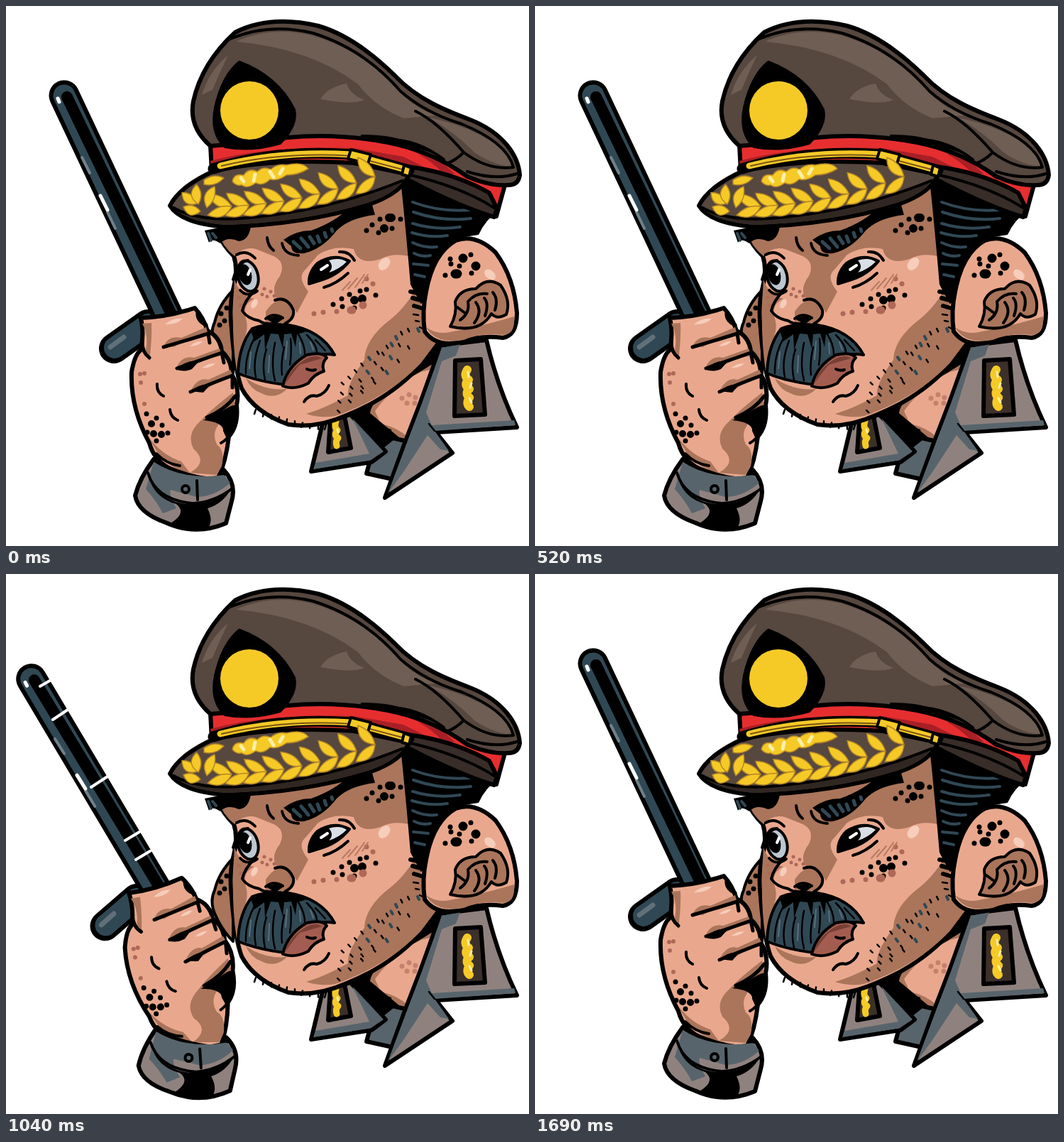
These frames come from a looping animation (737x760 px, 1820 ms). An HTML page:

```html
<!DOCTYPE html>
<html lang="en">
<head>
<meta charset="utf-8">
<title>Officer with baton</title>
<style>
html, body { margin: 0; height: 100%; overflow: hidden; background: #fff }
svg { display: block; width: 737px; height: 760px }
path, circle, ellipse { stroke-linecap: round; stroke-linejoin: round; fill: none }
.o { stroke: #000; stroke-width: 6 }
.l { stroke: #000; stroke-width: 4 }
.t { stroke: #000; stroke-width: 2.5 }
.k { fill: #000 }
.skin { fill: #e9a88d }
.shade { fill: #aa755b }
.pink { fill: #f7cdbb }
.cap { fill: #56473f }
.capLight { fill: #6f5e54 }
.red { fill: #e62e2f }
.gold { fill: #f5ca27 }
.navy { fill: #304854 }
.cloth { fill: #8f827e }
.clothDark { fill: #58646b }
.sn { stroke: #304854; stroke-width: 4 }
.sg { stroke: #f5ca27; stroke-width: 5 }
.sw { stroke: #fff; stroke-width: 4 }
.mole { stroke: #000; stroke-width: 10 }
.mole.s { stroke-width: 7 }
.spot { stroke: #ad6858; stroke-width: 7 }
.leaf { fill: #f5ca27; stroke: #b48526; stroke-width: 1.5 }
</style>
</head>
<body>
<svg viewBox="0 0 737 760">
<!-- neck and collar -->
<path class="k" d="M470 574L525 556L575 612L535 632Z"/>
<path class="shade" d="M475 565L590 480L620 490L575 620L535 600Z"/>
<path class="skin" d="M520 570Q545 535 585 515L605 510L568 608Q550 592 528 588Z"/>
<path class="k" d="M475 570Q550 550 612 470L622 490Q575 522 545 535Q515 556 513 573L555 608L536 605L500 582Z"/>
<path class="spot" style="opacity:.6" d="M558 552h0M568 547h0M577 551h0M565 559h0M576 559h0"/>
<path class="t" d="M518 588Q532 594 542 597"/>
<path class="o clothDark" d="M515 632L508 658L545 666L575 615L545 608Z"/>
<path class="o cloth" d="M430 655L446 588L485 575L535 627L515 642Z"/>
<path class="clothDark" d="M433 652L436 643L512 630L488 580L532 627L514 639Z"/>
<path class="o cloth" d="M534 692L563 612Q590 545 612 478L677 470Q692 535 720 593L606 600L629 629Z"/>
<path class="clothDark" d="M538 686L566 612Q592 545 614 481L640 476L634 492L614 500L592 572L600 590L716 583L718 590L604 598L624 626L612 624L594 604L560 656Z"/>
<path class="t" d="M604 598L596 588"/>
<path class="o" style="fill:#3c302b" d="M633 499L669 497L675 575L632 577Z"/>
<path class="o" style="fill:#3c302b" d="M457 583L477 577L486 622L454 628Z"/>
<path class="sg" style="stroke-width:12" d="M650 512q-6 9 2 14q-8 7 1 13q-7 6 0 12q-5 8 0 13"/>
<path class="sg" style="stroke-width:9" d="M465 584q-3 9 2 13q-6 7 1 11q-4 4-2 11"/>
<path style="stroke:#fff0a0;stroke-width:3" d="M651 515l1 7M656 531l-2 6M653 552l3 6M467 596l1 4"/>

<!-- far ear, head -->
<path class="l shade" d="M320 400Q300 420 294 445Q286 462 296 482Q305 502 320 517Z"/>
<path class="mole s" d="M303 433h0M308 443h0M301 449h0M311 425h0"/>
<path class="o skin" d="M298 318Q306 338 321 352Q327 370 321 395Q314 420 318 455Q322 510 332 538Q350 572 398 589Q438 595 480 576Q540 552 580 510L612 470L600 270L400 290Z"/>
<path class="shade" d="M297 316L345 310L560 256L568 352Q544 347 528 356Q496 366 490 342Q462 336 440 350L421 372Q410 382 426 402L410 432Q400 412 382 412Q372 398 386 380Q396 358 372 350L352 342Q335 338 322 352Q306 340 297 316Z"/>
<path class="shade" d="M578 398Q560 428 538 444Q506 470 505 498Q480 532 482 548Q450 566 423 574Q455 584 480 571Q545 545 585 502L606 474L590 440Z"/>
<path class="shade" d="M322 385Q330 408 350 412Q332 420 338 440Q343 455 333 475L326 520Q316 460 322 385ZM338 524Q365 542 396 539Q380 555 360 545Q345 540 338 524Z"/>
<path class="k" d="M280 316L300 312L345 310Q342 330 328 331Q312 324 302 334Q290 326 286 333Z"/>
<path class="sn" d="M285 320l4 10M291 320l5 6"/>

<!-- hair -->
<path class="k" d="M556 244L693 290Q676 300 666 322L640 326Q612 344 603 365L594 400L585 420L570 392Q564 320 556 244Z"/>
<path class="sn" d="M573 276Q615 292 664 286M574 290Q615 304 655 299M573 306Q605 316 640 311M572 319Q598 327 622 323M573 333Q590 341 607 339M575 348Q587 354 598 351M574 363L595 365M576 378L590 381"/>
<path class="o" d="M570 402l17 3M573 411l15 4M575 422l10 3"/>
<path class="t" d="M574 434l7 1M577 443l5 1M583 452l4 2"/>

<!-- near ear -->
<path class="o skin" d="M592 402Q602 348 634 330Q662 320 690 347Q716 382 720 432Q720 464 700 467Q670 463 645 472Q607 482 590 458Q586 430 592 402Z"/>
<path class="shade" d="M592 452Q608 464 630 458Q665 452 716 437Q718 463 700 463Q670 459 645 470Q606 477 592 452Z"/>
<path class="l shade" d="M626 451Q636 434 633 416Q640 398 662 398Q678 380 697 393Q712 415 705 434Q692 442 684 433Q668 461 626 451Z"/>
<path class="l" d="M640 442Q654 432 651 416Q662 403 678 405M660 446Q672 430 662 417M675 436Q681 419 674 411M689 428Q694 412 686 403M636 424L648 433"/>
<path class="mole" style="stroke-width:13" d="M633 377h3M644 355h0M662 366h0"/>
<path class="mole s" d="M627 363h0M619 379h0M639 366h0M655 350h0M656 376h0M626 356h0"/>
<g id="gloss"><ellipse class="pink" cx="533" cy="363" rx="7" ry="10" transform="rotate(40 533 363)"/><ellipse class="pink" cx="682" cy="378" rx="6" ry="9" transform="rotate(-50 682 378)"/></g>

<!-- eyes, brow, nose -->
<ellipse class="l" style="fill:#bcc7d0" cx="341" cy="380" rx="14" ry="22" transform="rotate(-15 341 380)"/>
<ellipse class="k" cx="337" cy="378" rx="9" ry="15" transform="rotate(-15 337 378)"/>
<path class="sw" d="M344 371l-3 7"/>
<path class="l" d="M320 385Q327 360 341 358M325 350Q339 342 351 355M330 400Q340 411 354 401"/>
<path class="l k" d="M427 391Q426 375 439 362Q462 347 484 359Q468 379 443 386Z"/>
<path style="fill:#d9e0e5" d="M455 358Q470 353 480 360Q469 371 455 375Q463 367 455 358Z"/>
<path class="sw" d="M444 371l9-6"/>
<path class="l" d="M448 396Q466 391 482 376M470 346Q484 345 491 358"/>
<g id="brow">
<path class="k" d="M391 329Q408 316 430 316Q466 303 484 283L514 273L520 294Q484 298 466 316Q446 342 420 348Q402 350 402 338Z"/>
<path class="sn" style="stroke-width:5" d="M405 332l10 9M416 327l10 12M428 325l6 9M439 324l3 8M449 319l2 6M459 314l1 3"/>
<path class="l" d="M368 326Q369 338 377 344M389 334Q392 350 412 351"/>
</g>
<path class="shade" d="M366 430Q378 412 393 413Q407 424 404 440Q385 451 366 445Z"/>
<path class="l" d="M350 401Q336 415 333 429Q340 440 357 443Q363 448 376 447M379 414Q396 408 405 428Q407 440 393 447M366 440Q377 431 390 439"/>
<path class="k" d="M366 440Q380 434 391 440L380 448Z"/>
<ellipse class="pink" cx="350" cy="419" rx="4" ry="7" transform="rotate(30 350 419)"/>

<!-- moustache and mouth -->
<path class="l navy" d="M327 517Q328 478 347 454Q368 446 398 449Q444 456 463 491Q445 488 427 494Q405 505 393 533Q353 528 327 517Z"/>
<path class="k" d="M345 457Q370 442 405 449L428 457L410 462L408 480L402 461L392 462L390 482L384 462L373 461L365 484L364 462L350 472Z"/>
<path class="t" d="M351 466Q337 490 338 517M358 471Q347 500 352 522M367 483Q360 505 365 526M379 474Q373 505 379 527M392 480Q387 502 389 519M401 468Q403 488 400 505M412 462Q422 478 421 493M424 463Q438 477 438 487M436 470L450 485"/>
<path style="stroke:#59707b;stroke-width:2" d="M345 487L343 510M371 492L370 516M396 472L394 497M414 474L415 489M429 473L433 484"/>
<path class="l" style="fill:#a35d50" d="M390 535Q396 507 424 491Q446 486 452 495Q444 503 448 514Q434 518 426 531Q406 541 390 535Z"/>
<path style="fill:#783f35" d="M394 531Q398 511 424 496Q438 490 445 496Q431 500 414 505Q405 515 394 531Z"/>
<path class="l" d="M424 511Q430 514 436 512M420 557Q427 546 438 549Q450 546 455 534"/>

<!-- moles, stubble -->
<path class="mole" style="stroke-width:12" d="M540 298h3M533 313h0M502 412h0M491 414h0"/>
<path class="mole s" d="M527 300h0M516 308h0M508 316h0M525 319h0M544 313h0M556 300h0M461 420h0M473 412h0M484 406h0M474 423h0M499 401h0M508 399h0M521 407h0M491 425h0"/>
<path class="spot" d="M447 431h0M466 430h0M434 433h0M517 391h0M508 384h0"/>
<path class="spot" style="stroke-width:11" d="M486 428h2M503 421h0"/>
<path class="spot" style="stroke-width:5" d="M364 398h0M373 402h0M368 409h0M378 408h0M361 406h0M330 421h0M328 410h0"/>
<path style="stroke:#b77962;stroke-width:2" d="M474 400l11-12M482 398l13-15M492 396l13-18M502 390l8-12"/>
<g id="stubble"></g>

<!-- cap -->
<path class="o red" d="M288 196L440 172L560 185L703 252L691 296L560 245L488 226L290 233Z"/>
<path style="fill:#a81f25" d="M288 218Q370 196 490 200L560 212L612 238L560 228L488 208Q380 200 290 232ZM545 190Q590 196 632 236L618 239Q600 214 545 190Z"/>
<path class="o" style="fill:#382d28" d="M565 226Q630 234 681 263L692 285L688 297Q640 283 563 243Z"/>
<path class="l" d="M570 238Q640 254 688 284"/>
<path class="o cap" d="M288 197Q257 170 264 134Q276 80 323 37Q372 12 440 28Q492 43 548 98C580 132 622 148 654 160C700 178 722 210 724 238Q722 252 708 252Q682 254 650 240Q600 204 538 192Q440 174 350 192Z"/>
<path class="capLight" d="M324 50Q372 28 430 41Q500 61 548 114Q572 142 606 154L560 158Q520 142 496 110Q430 60 324 50ZM596 157Q692 178 716 226Q690 226 660 206Q633 178 596 157ZM443 131Q453 114 480 109Q485 125 505 132Q488 140 443 131ZM276 125Q286 92 313 69Q301 94 291 118Z"/>
<path class="l" d="M314 47Q370 23 432 38Q504 60 556 120Q590 150 642 166Q706 192 715 227Q680 232 645 206M645 206Q633 218 620 222M577 148Q608 163 645 206M540 188Q580 188 617 216M720 236Q690 246 650 233"/>
<path class="k" d="M500 181Q560 180 605 209Q570 194 500 187Z"/>
<path class="o k" d="M329 80Q382 100 405 146Q410 167 386 192Q345 204 309 197Q289 178 296 143Q306 99 329 80Z"/>
<circle class="gold" cx="343" cy="147" r="41"/>
<path class="o cap" d="M231 281Q244 255 291 233Q370 214 490 221L568 237Q558 263 512 279Q425 307 310 311Q246 306 231 281Z"/>
<path style="fill:#312722" d="M236 285Q270 298 330 299Q460 288 562 242Q550 264 510 277Q420 304 310 308Q255 303 236 285Z"/>
<path class="l" d="M236 284Q270 303 330 299Q450 290 558 246"/>
<path style="stroke:#000;stroke-width:15" d="M292 229Q380 201 488 209L568 231"/>
<path class="sg" style="stroke-width:9" d="M302 225Q390 203 486 209L566 231"/>
<path style="stroke:#7b5415;stroke-width:2" d="M304 225Q390 205 486 211L566 232"/>
<path class="l gold" d="M486 202l-4 13l28 7l4-13ZM561 224l10 4l-3 12l-10-3Z"/>
<g id="leaves"></g>
<path class="leaf" d="M319 247q2-12 16-9q7-11 19-5q9-8 19-3q10-9 22-6q23-6 31 5q-14 9-31 9q-12 9-23 6q-10 10-20 5q-12 9-20 3q-7 2-13-5ZM279 245q14-10 28-3q-12 13-28 9Z"/>
<path style="stroke:#fff0a8;stroke-width:5" d="M331 242l4 5M351 237l-2 9M372 233l5 8M390 229l-4 7"/>

<!-- moving arm -->
<path id="glint" style="fill:#fff"/>
<g id="hand">
<path style="stroke:#000;stroke-width:42" d="M152 482L200 448"/>
<path style="stroke:#304854;stroke-width:30" d="M153 481L200 448"/>
<path style="stroke:#607079;stroke-width:7" d="M147 480L166 466"/>
<path style="stroke:#000;stroke-width:43" d="M82 126L233 446"/>
<path style="stroke:#304854;stroke-width:31" d="M82 126L233 446"/>
<path style="stroke:#000;stroke-width:16" d="M86 128L237 442"/>
<path style="stroke:#70818a;stroke-width:4" d="M107 213L118 235M143 290L154 313"/>
<path class="sw" style="stroke-width:5" d="M73 130L75 135M133 267L143 287"/>
<path class="o skin" d="M190 439Q228 438 266 425Q278 438 284 457Q302 466 304 486Q318 498 318 518Q330 538 325 562Q328 590 314 606Q310 641 299 664Q269 669 237 654Q209 642 202 615Q175 565 177 515Q181 491 190 484Q195 460 190 439Z"/>
<path class="shade" d="M222 479Q229 463 247 467L282 452L285 463Q253 470 237 480ZM240 509Q248 491 265 495L301 482L305 492Q277 497 258 510ZM260 542Q270 522 285 526L316 512L321 522Q291 531 276 544ZM282 576Q294 564 320 544L324 571Q314 583 302 586Q289 600 297 617Q309 626 304 648L297 660L259 657Q286 642 264 623Q255 605 269 589Z"/>
<path class="shade" d="M192 447Q203 466 195 491Q201 497 202 499Q206 468 205 446ZM203 609Q220 632 247 641L259 657Q220 650 203 609Z"/>
<path class="k" d="M278 583L303 571Q324 557 326 564Q329 602 311 609L306 598Q307 586 278 583ZM239 511q20-15 32-10l-9 10q-12 5-23 0ZM260 542q15-12 27-8l-9 10Z"/>
<path class="o" style="stroke-width:5" d="M222 480Q253 471 285 461L287 474M241 510Q275 498 304 488L307 502M260 543Q290 531 319 520L319 537M283 579Q309 568 323 549M270 432Q269 443 282 449M192 470Q191 487 202 495"/>
<path class="l" d="M213 532Q212 544 222 549M231 568Q232 579 242 583M303 615Q315 608 313 602M212 630Q225 644 245 647"/>
<path class="pink" d="M224 448q12-10 25-8q-9 9-25 8ZM259 479q8-8 18-7q-6 7-18 7ZM277 509q9-7 18-6q-7 7-18 6Z"/>
<path class="mole" d="M205 588h0M208 602h0M219 603h0"/>
<path class="mole s" d="M199 600h0M212 580h0M220 590h0M198 574h0M228 601h0M212 612h0"/>
<path class="spot" style="stroke-width:6" d="M190 530h0M195 517h0M189 518h0M195 560h0"/>
</g>
<g id="cuff">
<path class="o cloth" d="M208 638Q240 660 289 666Q310 664 307 653Q325 672 318 697L310 728Q267 746 225 727Q186 713 182 689Q188 665 208 638Z"/>
<path class="clothDark" d="M208 642Q250 668 307 660L316 671Q295 690 269 691L232 681Q229 688 240 707L221 714Q211 695 197 680Z"/>
<path class="k" d="M204 671Q225 700 258 701Q291 703 317 680Q305 701 284 707Q294 727 282 738Q251 739 230 729Q256 714 240 701Q213 693 204 671Z"/>
<path class="l" d="M200 657Q211 695 263 700Q292 699 319 679M269 668L270 695"/>
<circle class="l clothDark" cx="253" cy="680" r="5"/>
</g>
<path id="ticks" class="sw"/>
</svg>
<script>
const get = id => document.getElementById(id);

// Leaf garland: pairs of leaves along a bending stem on the visor.
let leaves = '';
const leaf = (x, y, angle, size = 36) =>
  `<path class="leaf" d="M0 0Q${size / 2}-17 ${size} 0Q${size / 2} 10 0 0Z" transform="translate(${x} ${y}) rotate(${angle})"/>`;
for (let i = 0; i < 9; i++) {
  const t = i / 8, u = 1 - t;
  const x = 318 * u * u + 2 * u * t * 415 + 520 * t * t;
  const y = 282 * u * u + 2 * u * t * 279 + 240 * t * t;
  leaves += leaf(x, y, 208 + 20 * t * t) + leaf(x, y, 160 - 22 * t);
}
leaves += leaf(270, 278, 215, 27) + leaf(271, 279, 265, 28) + leaf(283, 284, 290, 32) + leaf(274, 289, 195, 25);
get('leaves').innerHTML = leaves;

// Stubble: rows of short hairs following the jaw.
let dark = '', blue = '';
for (let row = 0; row < 4; row++)
  for (let i = 0; i < 8; i++) {
    const t = i / 7, sway = Math.sin(i * 7 + row * 5) * 3;
    const x = 580 - 110 * t - row * 11 * (1 - t) + sway, y = 454 + 118 * t ** .85 + row * (3 - 18 * t) + sway;
    const hair = `M${x} ${y}l${2 + t} ${4 - t}`;
    if ((i + row) % 3 || i > 4) dark += hair; else blue += hair;
  }
for (let i = 0; i < 10; i++) dark += `M${352 + i * 11} ${568 + 22 * Math.sin(i / 6)}l${-2 + i % 3} 6`;
get('stubble').innerHTML = `<path class="t" d="${dark}"/><path class="sn" d="${blue}"/>`;

// Each pose: arm angle and shift, cuff shift.
const poses = {
  left: [0, 0, 0, 0, 0],
  mid: [2.1, 0, 6, 1, 5],
  right: [4.5, 0, 5, 1, 5],
  back: [-5.5, 7, 3, 5, 1],
  front: [13.8, 0, -1, 5, 1]
};
const order = 'left mid right mid left mid right mid back front back right mid left'.split(' ');
const ticks = {
  back: 'M48 158L62 150M66 205L87 191M120 300L143 285M168 375L188 363M183 402L203 390',
  front: 'M202 104L220 102M206 135L219 134M224 216L244 214M247 336L264 335M258 387L271 385'
};
const glints = {
  6: 'M327 330L327 350L336 354L323 357L310 361L319 349Z',
  8: 'M315 360l5 5l-2 6l-6-5Z',
  9: 'M302 337l0 11l4 5l-9 1l-7-1l7-6Z'
};

function draw() {
  const step = Math.floor(performance.now() % 1820 / 130);
  const name = order[step], [angle, x, y, cx, cy] = poses[name];
  const tense = name === 'right' || name === 'front';
  get('hand').setAttribute('transform', `translate(${x} ${y}) rotate(${angle} 250 690)`);
  get('cuff').setAttribute('transform', `translate(${cx} ${cy}) rotate(${angle * .3} 250 700)`);
  get('brow').setAttribute('transform', tense ? 'translate(2 3) rotate(-3 510 285)' : '');
  get('gloss').setAttribute('transform', tense || name === 'mid' ? 'translate(-3 7)' : '');
  get('ticks').setAttribute('d', ticks[name] || '');
  get('glint').setAttribute('d', glints[step] || '');
  requestAnimationFrame(draw);
}
draw();
</script>
</body>
</html>
```
